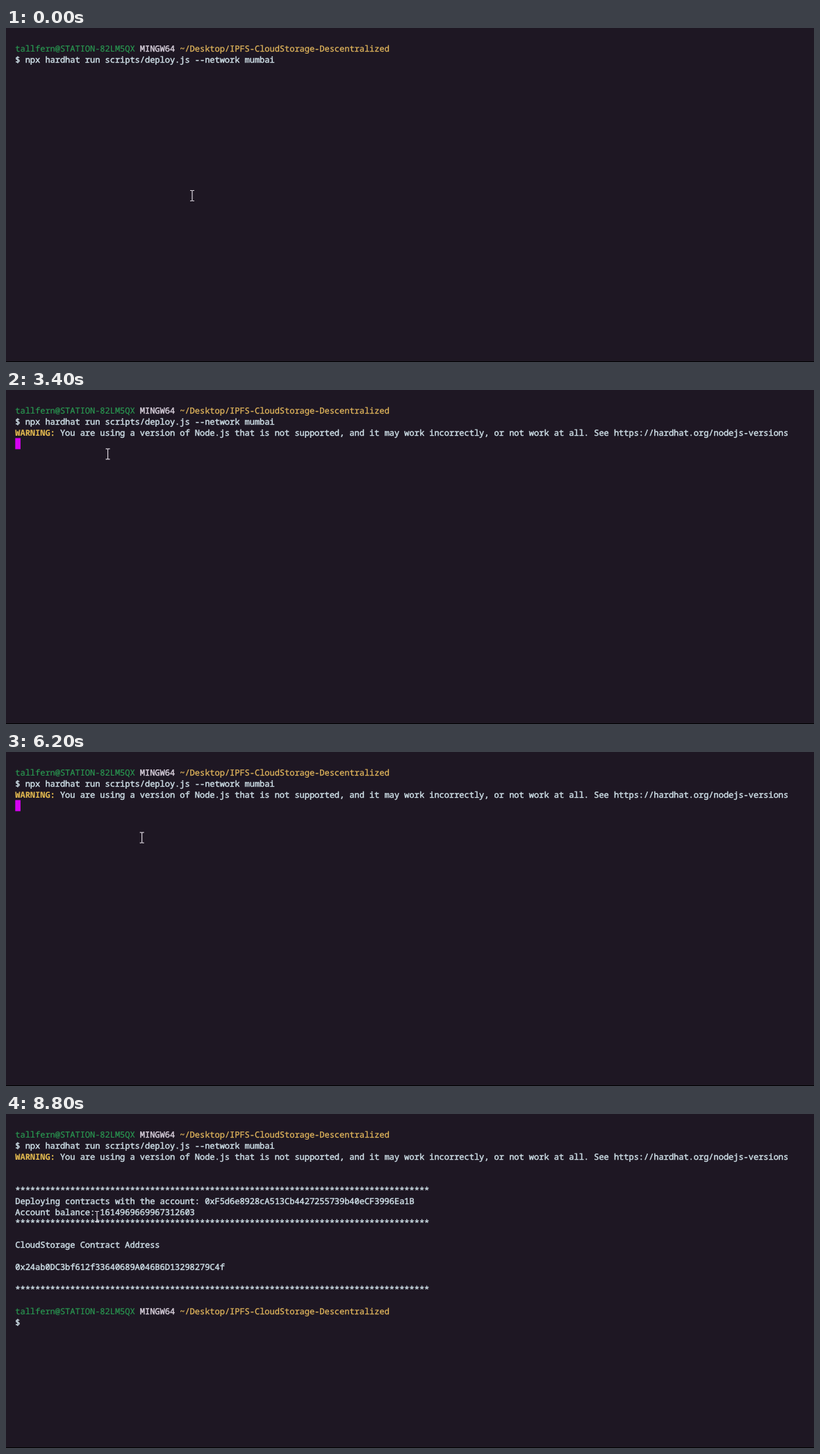
Animation, 1163 px wide and 482 px high, one loop 8900 ms. Source, as an HTML page:

```html
<!DOCTYPE html>
<html lang="en">
<head>
<meta charset="utf-8">
<title>Terminal deploy</title>
<style>
  html, body { margin: 0; width: 100%; height: 100%; overflow: hidden; background: #1e1723; }
  svg { display: block; width: 1163px; height: 482px; }
  text {
    font: 500 12px "Noto Sans Mono", "DejaVu Sans Mono", monospace;
    letter-spacing: -0.02px;
    white-space: pre;
    text-rendering: geometricPrecision;
    font-variant-ligatures: none;
  }
  tspan { color: #cfe0e8; fill: currentColor; stroke: currentColor; stroke-width: 0.45px; }
  .user { color: #2a9a52; stroke-width: 0.2px; }
  .shell { color: #d8d0dc; }
  .path { color: #e2b65c; stroke-width: 0.3px; }
  .warn { color: #e2b950; font-weight: 700; stroke-width: 0.1px; }
  #block { fill: #d602f2; }
  #mouse { fill: none; stroke: #d9d3dc; stroke-width: 1.2; }
</style>
</head>
<body>
<svg viewBox="0 0 1163 482">
  <rect y="481" width="1163" height="1" fill="#000"/>
  <g id="lines"></g>
  <rect id="block" width="7.6" height="16"/>
  <path id="mouse" d="M-3 -7.5H-1L0 -7L1 -7.5H3M0 -7V7M-3 7.5H-1L0 7L1 7.5H3"/>
</svg>
<script>
const LOOP = 8900, FRAME = 100, BLINK = 600;
const LEFT = 13.3, ADVANCE = 7.18, BASELINE = 34.2, PITCH = 15.9;
const FOCUS_AT = 100, WARNING_AT = 3400;

const prompt = [
  ["tallfern@STATION-82LM5QX", "user"], [" MINGW64", "shell"],
  [" ~/Desktop/IPFS-CloudStorage-Descentralized", "path"]
];
const warning = [
  ["WARNING:", "warn"],
  [" You are using a version of Node.js that is not supported, and it may work incorrectly, or not work at all. See https://hardhat.org/nodejs-versions", ""]
];
const stars = "*".repeat(83);

// Each stage starts on the row where the previous one left the text cursor.
const stages = [
  { at: 0, lines: [prompt, "$ npx hardhat run scripts/deploy.js --network mumbai "] },
  { at: 1500, lines: ["", ""] },
  { at: WARNING_AT, lines: [warning, ""] },
  { at: 6400, lines: ["", "", stars,
    "Deploying contracts with the account: 0xF5d6e8928cA513Cb4427255739b40eCF3996Ea1B",
    "Account balance: 1614969669967312603", ""] },
  { at: 7000, lines: [stars, "", "CloudStorage Contract Address", "",
    "0x24ab0DC3bf612f33640689A046B6D13298279C4f", "", stars, "", prompt, "$ "] }
];

const pointer = [
  { at: 0, x: 268, y: 242 }, { at: 700, x: 268, y: 242 },
  { at: 1300, x: 237, y: 161 }, { at: 1800, x: 237, y: 161 },
  { at: 2600, x: 111, y: 105 }, { at: 2900, x: 111, y: 105 },
  { at: 4100, x: 205.5, y: 71.5 }, { at: 5400, x: 436, y: 76.5 },
  { at: 6600, x: 111.5, y: 140 }, { at: 7700, x: 25.5, y: 162 },
  { at: LOOP - FRAME, x: 131, y: 148 }
];

const SVG = "http://www.w3.org/2000/svg";
const byId = id => document.getElementById(id);
const baseline = row => BASELINE + row * PITCH;
const make = (tag, parent, attrs) => {
  const node = parent.appendChild(document.createElementNS(SVG, tag));
  for (const key in attrs) node.setAttribute(key, attrs[key]);
  return node;
};
const show = (node, on) => node.setAttribute("visibility", on ? "visible" : "hidden");

function addLine(group, row, line) {
  const node = make("text", group, { x: LEFT, y: baseline(row) });
  const spans = typeof line === "string" ? [[line, ""]] : line;
  for (const [text, style] of spans) make("tspan", node, { class: style }).textContent = text;
}

let cursorRow = 0;
for (const stage of stages) {
  stage.group = make("g", byId("lines"));
  // An Enter key ends the command line before a blank one.
  const first = stage.at === 1500 ? cursorRow : cursorRow;
  stage.lines.forEach((line, i) => addLine(stage.group, first + i, line));
  cursorRow = stage.row = first + stage.lines.length - 1;
  stage.column = stage.lines[stage.lines.length - 1].length;
}

const lastBefore = (list, t) => list.reduce((found, item) => item.at <= t ? item : found);

function pointerAt(t) {
  const from = lastBefore(pointer, t);
  const to = pointer[pointer.indexOf(from) + 1];
  if (!to) return [from.x, from.y];
  const u = (t - from.at) / (to.at - from.at), eased = u * u * (3 - 2 * u);
  return [from.x + (to.x - from.x) * eased, from.y + (to.y - from.y) * eased];
}

function draw(t) {
  for (const { group, at } of stages) show(group, t >= at);

  // The text cursor is steady at first, then blinks, starting lit after each output.
  const { at, row, column } = lastBefore(stages, t);
  const lit = t < WARNING_AT ? t >= FOCUS_AT : (t - at) % (2 * BLINK) < BLINK;
  const block = byId("block");
  show(block, lit);
  block.setAttribute("x", LEFT + column * ADVANCE);
  block.setAttribute("y", baseline(row) - 12.5);

  byId("mouse").setAttribute("transform", `translate(${pointerAt(t)})`);
}

const origin = performance.now();
function tick() {
  const t = (performance.now() - origin) % LOOP;
  draw(Math.floor(t / FRAME) * FRAME);
  requestAnimationFrame(tick);
}
tick();
</script>
</body>
</html>
```
